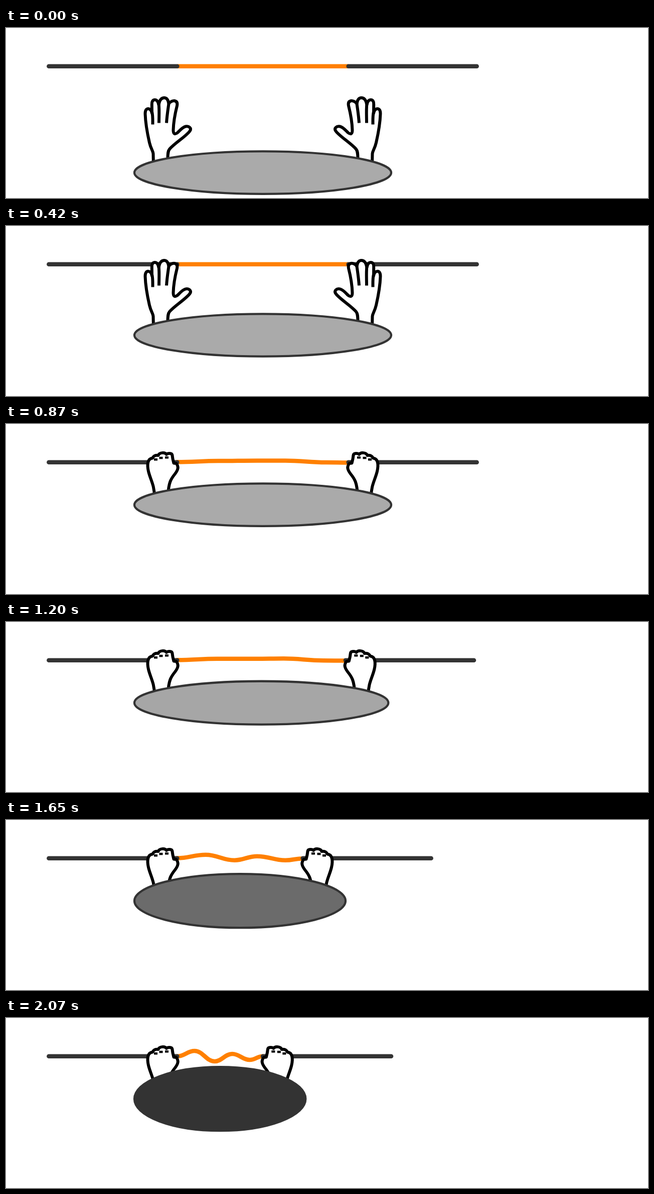
These frames come from a looping animation (1280x341 px, 2.7 s). An HTML page with a canvas:

```html
<!DOCTYPE html>
<html lang="en">
<head>
<meta charset="utf-8">
<title>Contraction</title>
<style>
  html, body { margin: 0; width: 100%; height: 100%; overflow: hidden; background: #fff; }
  canvas { display: block; }
</style>
</head>
<body>
<canvas id="stage" width="1280" height="341"></canvas>
<script>
const ctx = document.getElementById('stage').getContext('2d');
const LOOP = 2700, STEP = 30;
const GRAB = 870;
const UNIT = 1280 / 600;
const BAR_Y = 36 * UNIT;
const DARK = '#333', ORANGE = '#ff8000';

const openHand = {
  outline: new Path2D(`M294 274 L293.5 252 C293 246 289 243 286 230 C281 208 278 188 277.5 172
    C277.5 165 280 161.5 284 162 C288 162.5 290 166 291 171 L290.8 153
    C290.5 147 293 144 297 144 C301.5 144 303.5 149 304.5 154
    C306 145 310 140 315.5 140 C321 140 323.5 145 324.5 152
    C327 148 332 145.5 336 146 C341 147 342 151 341 156
    C338 168 334 185 333.5 205 C333.5 213 337 214 342 210
    C347 205 352 199 358 197.5 C365 196 370 201 367 206
    C361 216 336 231 326 243 C322 248 323 254 322 270`),
  details: new Path2D(`M291 168 C293 176 292.5 185 292.5 193.5
    M304.5 152 C306 163 305 178 305 190.5 M324.5 152 C323 163 321 175 320 190.5`),
  detailWidth: 6
};

const fist = {
  outline: new Path2D(`M296 146 C296 122 288 112 284 95 C281 82 282 69.5 292 68.5
    C294.5 63.5 299 62 303.5 63 C306 56.5 317 56.5 320 61
    C322 58.5 331 57.5 331.5 63 L332.5 70 L334.5 78.5 L339.5 79
    C345 86 343 92 337 100 C329 110 324 117 323 144`),
  details: new Path2D('M295 71.2 H302 M305.5 68 H312.5 M317 67.2 H324'),
  detailWidth: 4.5
};

// Rope nodes: [x, y] when slack starts, [x, y] when fully slack
const rope = [
  [341.3, 76.3, 341.3, 76.8],
  [423, 74, 376, 66],
  [501, 73.4, 416, 87],
  [557, 73.4, 451, 72],
  [638, 77, 486, 84],
  [682.7, 77.6, 512, 76.8]
];

const mix = (a, b, p) => a + (b - a) * p;

// Tweens advance in whole steps, the first one already visible at `start`
function progress(t, start, steps) {
  const done = Math.floor((t - start) / STEP) + 1;
  return Math.min(Math.max(done / steps, 0), 1);
}

function strokeLine(x1, x2, color, cap) {
  ctx.strokeStyle = color;
  ctx.lineCap = cap;
  ctx.lineWidth = 4 * UNIT;
  ctx.beginPath();
  ctx.moveTo(x1, BAR_Y);
  ctx.lineTo(x2, BAR_Y);
  ctx.stroke();
}

function drawRope(p) {
  const nodes = rope.map(([x0, y0, x1, y1]) => [mix(x0, x1, p), mix(y0, y1, p)]);
  ctx.strokeStyle = ORANGE;
  ctx.lineCap = 'round';
  ctx.lineWidth = 4 * UNIT;
  ctx.beginPath();
  ctx.moveTo(...nodes[0]);
  for (let i = 1; i < nodes.length; i++) {
    const [ax, ay] = nodes[i - 1], [bx, by] = nodes[i];
    const handle = (bx - ax) * 0.42;
    ctx.bezierCurveTo(ax + handle, ay, bx - handle, by, bx, by);
  }
  ctx.stroke();
}

function drawHand(hand, dx, dy, mirrored) {
  ctx.save();
  ctx.translate(dx, dy);
  if (mirrored) {
    ctx.translate(480 * UNIT, 0);
    ctx.scale(-1, 1);
  }
  ctx.fillStyle = '#fff';
  ctx.strokeStyle = '#000';
  ctx.lineCap = 'butt';
  ctx.lineJoin = 'round';
  ctx.fill(hand.outline);
  ctx.lineWidth = 6;
  ctx.stroke(hand.outline);
  ctx.lineWidth = hand.detailWidth;
  ctx.stroke(hand.details);
  ctx.restore();
}

function drawBody(lift, pull) {
  const gray = Math.round(mix(170, 51, pull));
  ctx.fillStyle = `rgb(${gray}, ${gray}, ${gray})`;
  ctx.strokeStyle = DARK;
  ctx.lineWidth = 2 * UNIT;
  ctx.beginPath();
  ctx.ellipse(mix(240, 200, pull) * UNIT, 136 * UNIT + lift,
    mix(120, 80, pull) * UNIT, mix(20, 30, pull) * UNIT, 0, 0, 2 * Math.PI);
  ctx.fill();
  ctx.stroke();
}

function draw(t) {
  const lift = -60 * UNIT * progress(t, 300, 9);
  const pull = progress(t, 1200, 30);
  const shift = -80 * UNIT * pull;
  const gripping = t >= GRAB;

  ctx.fillStyle = '#fff';
  ctx.fillRect(0, 0, 1280, 341);

  if (gripping) drawRope(pull);
  else strokeLine(160 * UNIT, 320 * UNIT, ORANGE, 'butt');
  strokeLine(40 * UNIT, 160 * UNIT, DARK, 'round');
  strokeLine(320 * UNIT + shift, 440 * UNIT + shift, DARK, 'round');

  const hand = gripping ? fist : openHand;
  const handLift = gripping ? 0 : lift;
  drawHand(hand, 0, handLift, false);
  drawHand(hand, shift, handLift, true);
  drawBody(lift, pull);
}

const start = performance.now();
function frame() {
  draw((performance.now() - start) % LOOP);
  requestAnimationFrame(frame);
}
frame();
</script>
</body>
</html>
```
